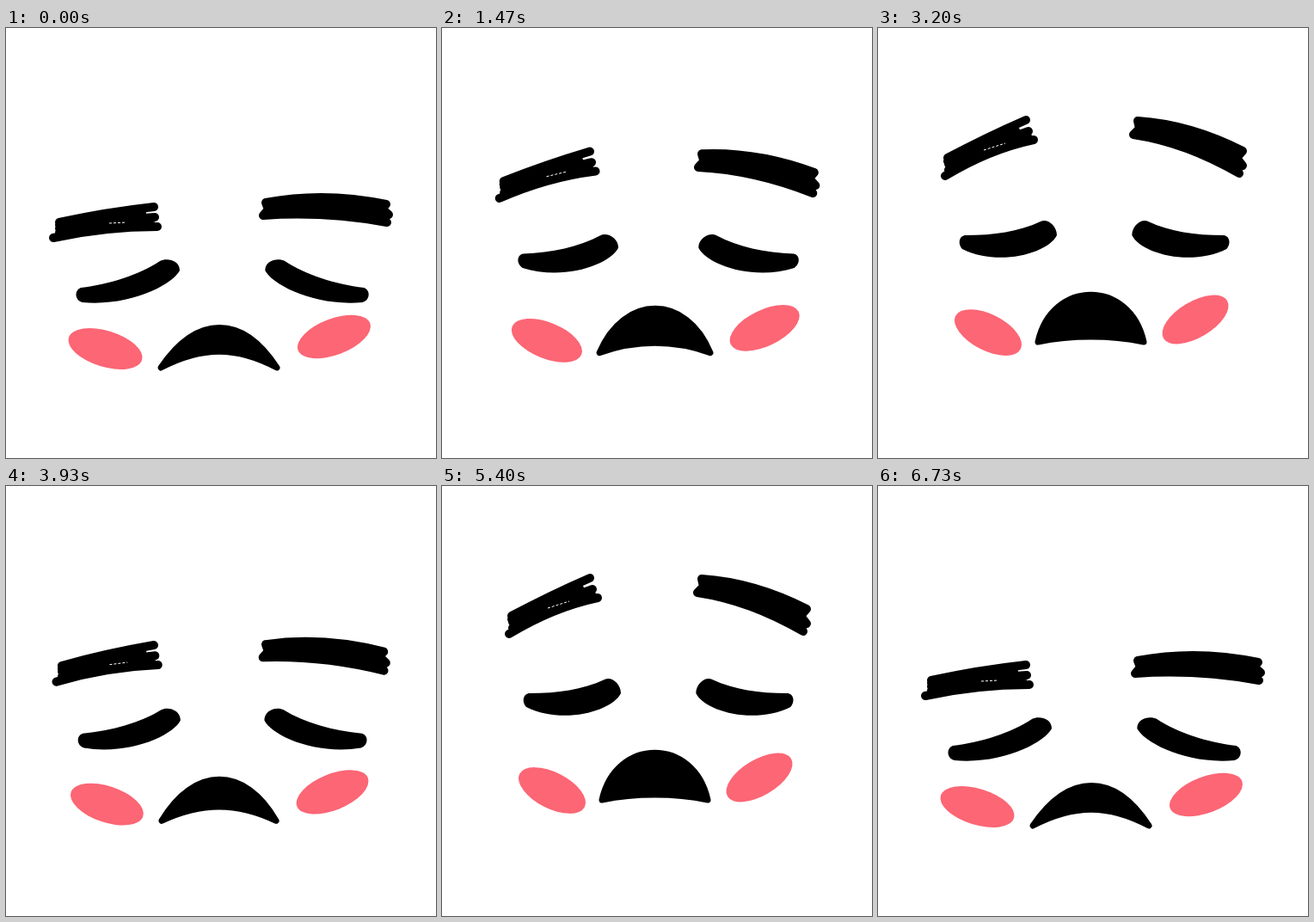
Recreate the animation shown at these times as an HTML page with a canvas. Size 500 px wide and 500 px high, loop 6.79 s.

```html
<!DOCTYPE html>
<html lang="en">
<head>
<meta charset="utf-8">
<title>Sighing face</title>
<style>
  html, body { margin: 0; width: 100%; height: 100%; overflow: hidden; background: #fff; }
  canvas { display: block; }
</style>
</head>
<body>
<canvas id="stage" width="500" height="500"></canvas>
<script>
const ctx = document.getElementById('stage').getContext('2d');
const LOOP = 6790, FPS = 15, BREATH = 34; // BREATH: frames per sigh

// Each part is a pair of matching paths: face lowered, face raised.
const leftBrow = [
  'M62 226Q117 214 172 208M62 229Q110 219 158 215M62 233Q117 223 173 220M62 238Q115 229 168 226M55 244Q115 231 176 231',
  'M81 151Q126 127 172 107M81 155Q120 134 160 119M82 158Q128 136 175 120M82 165Q128 141 174 126M78 172Q129 141 181 130'
];
const browGap = ['M120 227L140 226', 'M123 142L148 134'];
const rightBrow = [
  'M302 203Q370 190 442 205L437 210L445 217L437 221L443 226Q370 213 299 218L305 211Z',
  'M302 108Q363 112 424 143L417 151L424 160L416 163L420 169Q358 133 297 124L304 117Z'
];
const eye = [
  'M87 302C120 298 155 287 179 271C186 267 202 269 202 282C194 298 145 324 89 319C80 317 79 305 87 302Z',
  'M102 241C135 241 163 237 189 225C197 221 208 230 208 241C198 262 140 278 98 257C92 250 95 241 102 241Z'
];
const mouth = [
  'M180 395C222 333 275 333 315 395C268 370 228 370 180 395Z',
  'M186 365C202 292 293 292 309 365C270 357 225 357 186 365Z'
];
// Centre x, centre y, long radius, tilt in degrees
const cheeks = [
  [[115.5, 373, 44.5, 17], [128, 354, 42.5, 27]],
  [[381.5, 359, 44.7, -20.5], [369, 339, 43, -30.7]]
];

const lerp = (a, b, k) => a + (b - a) * k;

function ease(x) {
  x = Math.min(1, Math.max(0, x));
  return x < .5 ? 4 * x ** 3 : 1 - 4 * (1 - x) ** 3;
}

// 0 = lowered, 1 = raised; up and down delay a part behind the cheeks
function lift(ms, up, down) {
  return ease(ms / (575 + up)) - ease((ms - 870 - down) / 1200);
}

function morph([low, high], kx, ky) {
  const ends = high.match(/[\d.]+/g);
  let i = 0;
  return new Path2D(low.replace(/[\d.]+/g, n => {
    const k = i % 2 ? ky : kx;
    return lerp(+n, +ends[i++], k) + ' ';
  }));
}

function stroke(path, width, color = '#000') {
  ctx.lineWidth = width;
  ctx.strokeStyle = color;
  ctx.stroke(path);
}

function draw(ms) {
  const side = lift(ms, 0, 0), brow = lift(ms, 45, 58);
  ctx.fillStyle = '#fff';
  ctx.fillRect(0, 0, 500, 500);

  ctx.fillStyle = '#fc6675';
  for (const [low, high] of cheeks) {
    const [x, y, r, tilt] = low.map((v, i) => lerp(v, high[i], side));
    ctx.beginPath();
    ctx.ellipse(x, y, r, 21, tilt * Math.PI / 180, 0, 7);
    ctx.fill();
  }

  ctx.fillStyle = '#000';
  ctx.lineCap = ctx.lineJoin = 'round';
  stroke(morph(leftBrow, side, brow), 10);
  ctx.lineCap = 'butt';
  ctx.setLineDash([3, 2]);
  stroke(morph(browGap, side, brow), 1, '#fff');
  ctx.setLineDash([]);

  const right = morph(rightBrow, side, lift(ms, 10, 38));
  ctx.fill(right);
  stroke(right, 10);

  const lid = morph(eye, side, lift(ms, 62, 62));
  ctx.fill(lid);
  ctx.save();
  ctx.translate(503.3, 0);
  ctx.scale(-1, 1);
  ctx.fill(lid);
  ctx.restore();

  const lips = morph(mouth, side, lift(ms, 20, 30));
  ctx.fill(lips);
  stroke(lips, 7);
}

const start = performance.now();
function tick() {
  const t = (performance.now() - start) % LOOP;
  const frame = Math.floor((t + 4) * FPS / 1000);
  draw(frame % BREATH * 1000 / FPS);
  requestAnimationFrame(tick);
}
tick();
</script>
</body>
</html>
```
